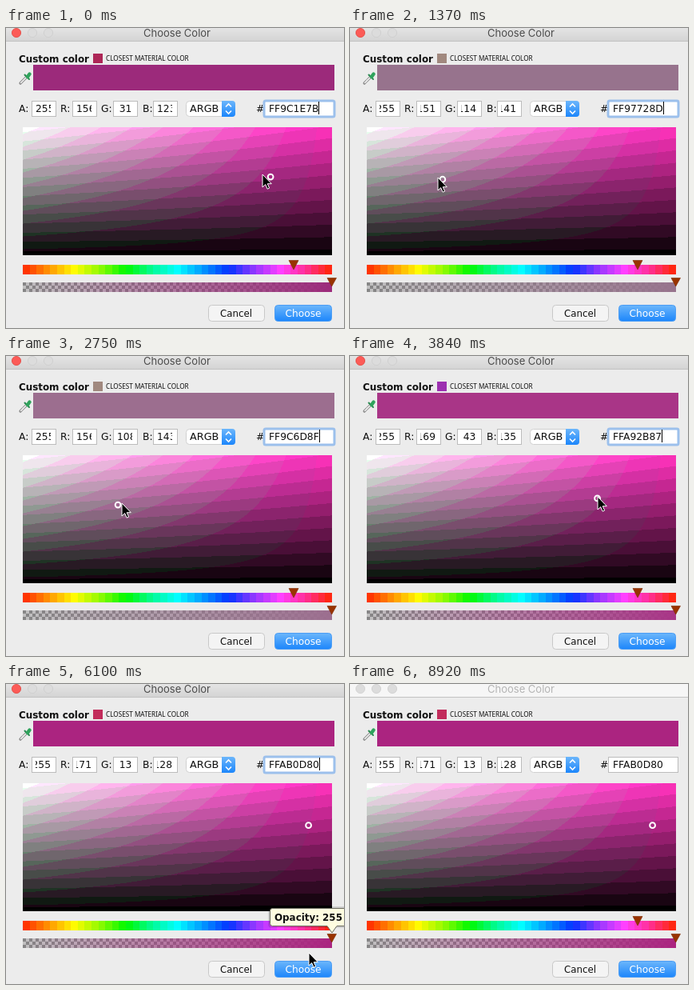
An HTML page with a canvas for the animation above (9.02 s loop, 423 px wide and 375 px high).

```html
<!DOCTYPE html>
<html lang="en">
<head>
<meta charset="utf-8">
<title>Choose Color</title>
<style>
  html, body { margin: 0; width: 100%; height: 100%; overflow: hidden; background: #ececec; }
  canvas { position: absolute; left: 21px; top: 124px; }
  #ui { position: absolute; left: 0; top: 0; width: 423px; height: 375px; }
  text { font: 12.3px "DejaVu Sans", sans-serif; fill: #111; white-space: pre; }
  text.bold { font-weight: bold; font-size: 11.9px; }
  text.small { font: 8.2px "Noto Sans", sans-serif; }
  text.title { font: 13px Inter, sans-serif; fill: #4b4b4b; }
  text.button { font-size: 11.8px; text-anchor: middle; }
  .field { fill: #fff; stroke: #bcbcbc; }
  .inactive #bar { fill: #f6f6f6; }
  .inactive .title { fill: #b4b4b4; }
  .inactive #close { fill: #dcdcdc; stroke: #d0d0d0; }
  .inactive #focus, .inactive #caret { visibility: hidden; }
</style>
</head>
<body>
<canvas id="shades" width="387" height="160"></canvas>
<svg id="ui" viewBox="0 0 423 375">
  <defs>
    <linearGradient id="barFill" x2="0" y2="1"><stop stop-color="#e4e4e4"/><stop offset="1" stop-color="#d4d4d4"/></linearGradient>
    <linearGradient id="blue" x2="0" y2="1"><stop stop-color="#6cb6fb"/><stop offset="1" stop-color="#1c86fb"/></linearGradient>
    <linearGradient id="fade"><stop id="fadeFrom" stop-opacity="0"/><stop id="fadeTo" offset="1"/></linearGradient>
    <pattern id="checks" x="21" y="318" width="8" height="8" patternUnits="userSpaceOnUse">
      <path d="M0 0H8V8H0Z" fill="#868686"/><path d="M4 0H8V4H4ZM0 4H4V8H0Z" fill="#c0c0c0"/>
    </pattern>
  </defs>

  <rect id="bar" width="423" height="16" fill="url(#barFill)"/>
  <path d="M0 16.5H423" stroke="#c2c2c2"/>
  <circle id="close" cx="13" cy="6" r="5.6" fill="#fc5b57" stroke="#e2463f" stroke-width=".8"/>
  <g fill="#dcdcdc" stroke="#cdcdcd" stroke-width=".8"><circle cx="33" cy="6" r="5.6"/><circle cx="53" cy="6" r="5.6"/></g>
  <text class="title" x="214" y="11" text-anchor="middle">Choose Color</text>

  <text class="bold" x="16" y="43">Custom color</text>
  <rect id="closest" x="109" y="32" width="12" height="12"/>
  <text class="small" x="125" y="41">CLOSEST MATERIAL COLOR</text>
  <g stroke-linecap="round" fill="none">
    <path d="M18 69L26 61" stroke="#858585" stroke-width="3.2"/>
    <path d="M18.5 68.5L25 62" stroke="#f4f4f4" stroke-width="1.6"/>
    <path d="M23.5 58.5L29 64" stroke="#2c8a52" stroke-width="2"/>
    <path d="M27 61L29.5 57.5" stroke="#2fa35c" stroke-width="4.4"/>
  </g>
  <rect id="swatch" x="34" y="46" width="377" height="32"/>

  <g id="fields"></g>
  <rect x="225.5" y="91.5" width="61" height="19" rx="4" fill="#fff" stroke="#d0d0d0"/>
  <path d="M270 91H283a4 4 0 0 1 4 4V107a4 4 0 0 1 -4 4H270Z" fill="url(#blue)"/>
  <path d="M275 98.5L278.5 95L282 98.5M275 103.5L278.5 107L282 103.5" fill="none" stroke="#fff" stroke-width="1.6"/>
  <text x="230" y="105" style="font-size:12.8px">ARGB</text>
  <text x="313" y="105">#</text>
  <rect class="field" x="323.5" y="91.5" width="87" height="19"/>
  <rect id="focus" x="323" y="91" width="88" height="20" rx="2" fill="none" stroke="#9cc0ec" stroke-width="3"/>
  <text id="hex" x="329" y="105"></text>
  <rect id="caret" y="92" width="1" height="16"/>

  <svg id="hues" x="21" y="296" width="387" height="12" shape-rendering="crispEdges"></svg>
  <rect x="21" y="318" width="387" height="12" fill="url(#checks)"/>
  <rect x="21" y="318" width="387" height="12" fill="url(#fade)"/>

  <g stroke="#c8c8c8">
    <rect x="253.5" y="346.5" width="70" height="20" rx="4" fill="#f4f4f4"/>
    <rect x="336.5" y="346.5" width="71" height="20" rx="4" fill="url(#blue)" stroke="#4b9df5"/>
  </g>
  <text class="button" x="288" y="361">Cancel</text>
  <text class="button" x="372" y="361" style="fill:#fff;font-size:12.2px">Choose</text>

  <circle id="ring" r="3.4" fill="none" stroke="#fff" stroke-width="2"/>
  <g fill="#993300" stroke="#7d2a00" stroke-width=".6">
    <path d="M354 290.500H366L360 302Z"/><path d="M402 312.500H413.500L407.700 323Z"/>
  </g>
  <g id="tip">
    <path d="M328 283Q328 278 333 278H423V305H333Q328 305 328 300Z" fill="#000" opacity=".12"/>
    <path d="M425 280.500H333.500Q330.500 280.500 330.500 283.500V299.500Q330.500 302.500 333.500 302.500H402L408 311L414 302.500H425Z" fill="#fefde0" stroke="#6b6b60"/>
    <text class="bold" x="336" y="296">Opacity: 255</text>
  </g>
  <path id="cursor" d="M0 0V16L3.700 12.600L6.100 18.200L8.600 17.100L6.200 11.700H11.300Z" stroke="#fff"/>
</svg>
<script>
const LOOP = 9020, STEP = 57.3, BLUR_AT = 8920;
const HEX_LAG = 0.35;   // the hex field trails the number fields, in steps
const BLUE_MIX = 0.262; // share of chroma missing from blue at this hue
const BOX = { x: 21, y: 124, w: 387, h: 160 };
const $ = id => document.getElementById(id);
const clamp = (v, lo, hi) => Math.min(hi, Math.max(lo, v));
const parse = hex => [0, 2, 4].map(i => parseInt(hex.slice(i, i + 2), 16));
const css = rgb => `rgb(${rgb.map(Math.round)})`;

// Display profile: a little red light leaks into green.
function shown([r, g, b]) {
  const red = r ** 2.2, green = g ** 2.2;
  return [r, (green + 0.029 * (red - green)) ** (1 / 2.2), b];
}

// Tables are [step, ...values]
const COLORS = [[-2, 156, 28, 123], [-1, 156, 31, 123], [23, 151, 114, 141], [34, 151, 121, 143],
  [47, 156, 108, 143], [66, 169, 42.6, 135], [80, 171, 16, 129], [89, 171, 13, 128]];
const POINTER = [[-1, 321, 183], [23, 110, 187], [34, 98, 187], [47, 145, 184], [66, 310, 176],
  [80, 373, 174], [89, 380, 175], [97, 380, 175], [105, 379, 336], [107, 373, 352],
  [112, 373, 352], [116, 374, 371]];
const CLOSEST = [[-1, 'ad1457'], [9, '8e24aa'], [16, '8d6e63'], [20, 'a1887f'],
  [55, 'ab47bc'], [60, '9c27b0'], [72, 'c2185b']];

// Monotone cubic through a table.
function sample(table, n) {
  const last = table.length - 1;
  if (n >= table[last][0]) return table[last].slice(1);
  const i = table.findIndex(row => row[0] > n) - 1;
  const rise = (k, c) => (table[k + 1][c] - table[k][c]) / (table[k + 1][0] - table[k][0]);
  const slope = (k, c) => {
    if (k === 0) return rise(0, c);
    if (k === last) return rise(last - 1, c);
    const a = rise(k - 1, c), b = rise(k, c);
    return a * b > 0 ? 2 * a * b / (a + b) : 0;
  };
  const span = table[i + 1][0] - table[i][0], u = (n - table[i][0]) / span;
  return table[i].slice(1).map((from, k) => {
    const c = k + 1, to = table[i + 1][c];
    return from + (to - from) * u * u * (3 - 2 * u)
      + span * u * (1 - u) * (slope(i, c) * (1 - u) - slope(i + 1, c) * u);
  });
}

function paintShades() {
  const ctx = $('shades').getContext('2d');
  const image = ctx.createImageData(BOX.w, BOX.h);
  const band = (v, levels) => Math.round(v * levels) / levels;
  for (let y = 0, p = 0; y < BOX.h; y++) {
    for (let x = 0; x < BOX.w; x++, p += 4) {
      const s = x / BOX.w, v = 1 - y / BOX.h;
      const g = band(v * (1 - s), 10), b = band(v * (1 - BLUE_MIX * s), 14);
      const r = clamp((b - BLUE_MIX * g) / (1 - BLUE_MIX), 0, 1);
      image.data.set([...shown([r * 255, g * 255, b * 255]), 255], p);
    }
  }
  ctx.putImageData(image, 0, 0);
}

function add(parent, tag, attrs, text = '') {
  const el = document.createElementNS('http://www.w3.org/2000/svg', tag);
  for (const key in attrs) el.setAttribute(key, attrs[key]);
  el.textContent = text;
  return parent.appendChild(el);
}

function paintHues() {
  const stops = ['ff2600', 'ff9300', 'fffb00', '8efa00', '00f900', '00fa92', '00fdff',
    '0096ff', '0433ff', '9437ff', 'ff40ff', 'ff2f92', 'ff2600'].map(parse);
  const count = 45, w = BOX.w / count;
  for (let i = 0; i < count; i++) {
    const at = (i + 0.5) / count * (stops.length - 1), k = Math.floor(at);
    const fill = css(stops[k].map((v, c) => v + (stops[k + 1][c] - v) * (at - k)));
    add($('hues'), 'rect', { x: i * w, width: w + 0.5, height: 12, fill });
  }
}

const fields = [['A:', 16, 32], ['R:', 68, 83], ['G:', 119, 134], ['B:', 171, 184]].map(([name, x, left]) => {
  const group = $('fields');
  add(group, 'text', { x, y: 105 }, name);
  add(group, 'rect', { class: 'field', x: left + 0.5, y: 91.5, width: 30, height: 19 });
  const view = add(group, 'svg', { x: left + 5, y: 92, width: 19, height: 18 });
  return add(view, 'text', { y: 13 });
});

function setField(el, value, scrolled) {
  const fits = value < 100;
  el.textContent = value;
  el.setAttribute('x', fits ? 10.5 : scrolled ? 19 : 0);
  el.setAttribute('text-anchor', fits ? 'middle' : scrolled ? 'end' : 'start');
}

function render(t) {
  const n = Math.max(-1, Math.floor((t - 50) / STEP));
  const rgb = sample(COLORS, n).map(Math.round);
  const lagging = sample(COLORS, n - HEX_LAG).map(Math.round);
  const max = Math.max(...rgb), min = Math.min(...rgb);
  const fill = css(shown(rgb));

  $('swatch').setAttribute('fill', fill);
  $('fadeFrom').setAttribute('stop-color', fill);
  $('fadeTo').setAttribute('stop-color', fill);
  $('closest').setAttribute('fill', css(shown(parse(CLOSEST.findLast(row => row[0] <= n)[1]))));
  $('ring').setAttribute('cx', BOX.x + BOX.w * (1 - min / max));
  $('ring').setAttribute('cy', BOX.y + BOX.h * (1 - max / 255));

  const scrolled = !(t < 910 || (t >= 1880 && t < 2810));
  [255, ...rgb].forEach((v, i) => setField(fields[i], v, scrolled));
  const hex = $('hex');
  hex.textContent = 'FF' + lagging.map(v => v.toString(16).padStart(2, '0')).join('').toUpperCase();
  $('caret').setAttribute('x', Math.round(329 + hex.getComputedTextLength()));
  $('caret').style.opacity = t < 5150 || Math.floor((t - 5150) / 490) % 2 ? 1 : 0;

  const [x, y] = sample(POINTER, n);
  $('cursor').setAttribute('transform', `translate(${Math.round(x)} ${Math.round(y)})`);
  $('cursor').style.opacity = t < 8230 ? 1 : 0;
  $('tip').style.opacity = t < 5980 ? 0 : clamp((8230 - t) / 350, 0, 1);
  $('ui').classList.toggle('inactive', t >= BLUR_AT);
}

paintShades();
paintHues();
const start = performance.now();
function tick() {
  render((performance.now() - start) % LOOP);
  requestAnimationFrame(tick);
}
tick();
</script>
</body>
</html>
```
